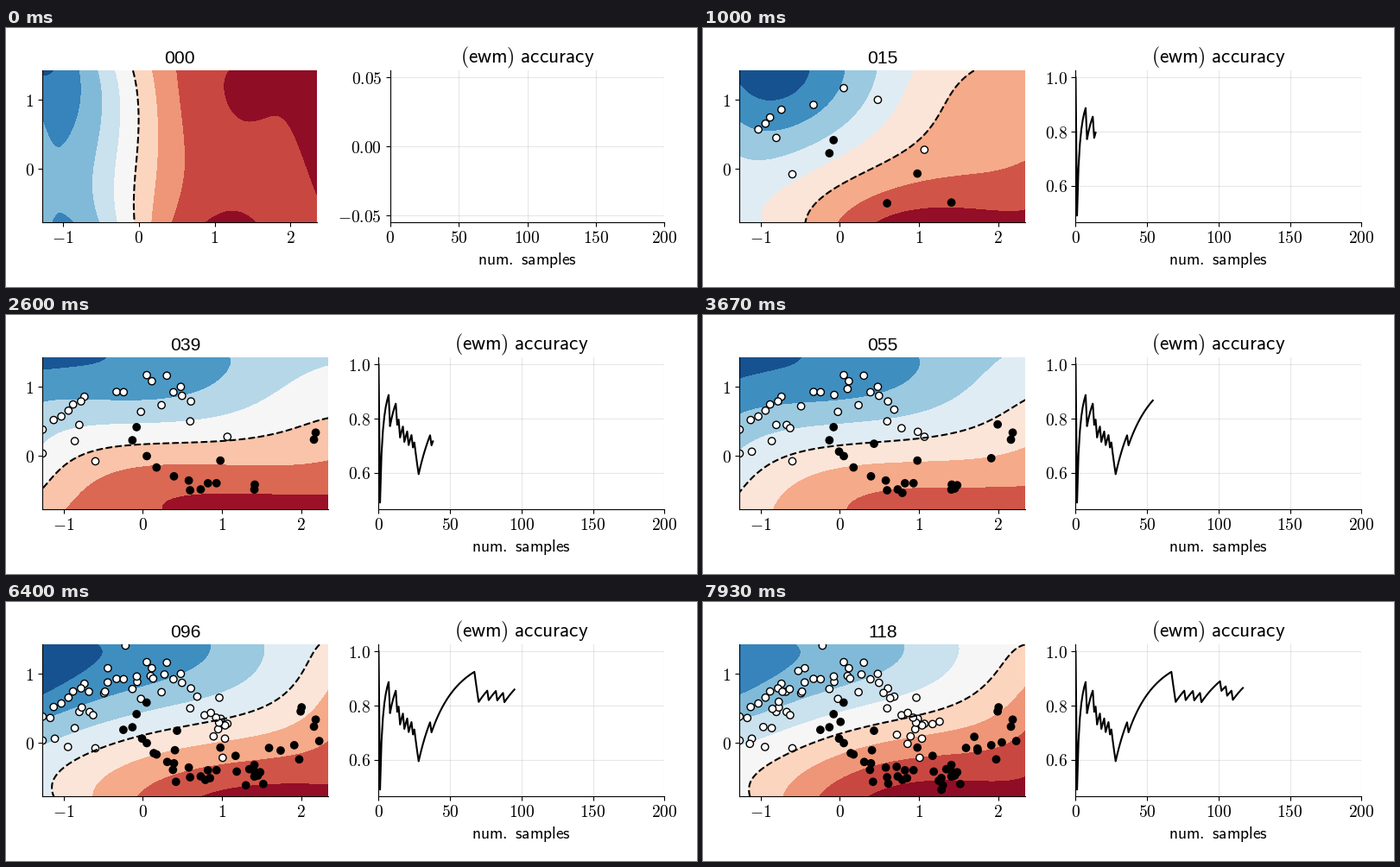
Recreate the animation shown at these times as a matplotlib script. Size 800x300 px, loop 8000 ms.

```python
import matplotlib.pyplot as plt
import numpy as np
from matplotlib.animation import FuncAnimation

plt.rcParams.update({
    "font.family": "DejaVu Sans",
    "font.size": 14,
    "mathtext.fontset": "cm",
    "axes.spines.top": False,
    "axes.spines.right": False,
    "xtick.major.pad": 3,
})

W, H, DPI = 800, 300, 100
FRAMES, LOOP_MS = 120, 8000
TOP, BOTTOM = 49.3, 225.3
XLIM, YLIM = (-1.267, 2.347), (-0.78, 1.425)

# Learning stages: step, lowest and highest band, and the classifier score
# on a coarse grid over the panel (rows from top to bottom)
STAGES = [
    (0, -5, 4, [[-4.2, -1.25, 2.1, 3.05, 3.6],
                [-3.0, -1.5, 1.9, 3.0, 3.5],
                [-2.7, -1.2, 1.85, 2.8, 3.2],
                [-2.65, -1.4, 2.3, 3.08, 2.7]]),
    (6, -4, 3, [[-3.6, -3.05, -0.1, 1.35, 1.5],
                [-2.8, -2.4, 0.3, 1.6, 1.6],
                [-2.05, -1.2, 1.15, 1.8, 1.8],
                [-1.9, -0.45, 2.25, 2.7, 2.5]]),
    (24, -5, 3, [[-4.9, -4.9, -3.6, -1.85, -0.65],
                 [-3.25, -3.4, -2.55, -1.05, -0.45],
                 [-1.2, -0.85, -0.6, 0.0, 0.55],
                 [-0.45, 0.8, 2.0, 2.7, 2.2]]),
    (39, -4, 3, [[-3.5, -2.95, -2.4, -1.75, -1.15],
                 [-1.85, -1.7, -1.55, -0.88, -0.2],
                 [-0.7, 0.5, 0.75, 0.75, 0.95],
                 [0.6, 1.6, 2.15, 2.5, 2.5]]),
    (96, -4, 4, [[-3.8, -2.9, -2.35, -1.15, 0.1],
                 [-3.0, -2.0, -1.3, -0.45, 1.1],
                 [-1.0, 0.1, 0.9, 1.4, 2.1],
                 [-0.3, 1.5, 2.8, 3.4, 3.3]]),
    (119, -5, 4, [[-3.8, -2.9, -2.3, -1.1, 0.0],
                  [-3.0, -2.05, -1.25, -0.3, 1.2],
                  [-1.0, 0.1, 1.15, 1.65, 2.35],
                  [-0.3, 1.8, 3.2, 3.5, 3.4]]),
]

# Steps at which the classifier guessed wrong
MISSES = {1, 8, 13, 15, 18, 21, 24, 26, 27, 28, 37, 68, 69, 70, 77, 83, 88,
          102, 106, 110}

# The opening samples: x, y, class (1 = black)
OPENING = [(-1.03, 0.57, 0), (0.98, -0.07, 1), (0.05, 1.17, 0),
           (-0.6, -0.08, 0), (1.41, -0.49, 1), (0.48, 1.0, 0)]


def basis(count, t):
    """Polynomial weights of evenly spaced nodes on [0, 1]."""
    nodes = np.linspace(0, 1, count)
    return np.vander(t, count) @ np.linalg.inv(np.vander(nodes, count))


def surface(grid):
    rows, cols = np.shape(grid)
    return (basis(rows, np.linspace(1, 0, 70)) @ np.array(grid)
            @ basis(cols, np.linspace(0, 1, 110)).T)


def moons(n, rng, noise=0.17):
    """Noisy samples from two interlocking half circles."""
    label = (rng.random(n) < 0.45).astype(int)
    angle = rng.uniform(0, np.pi, n)
    x = np.where(label, 1 - np.cos(angle), np.cos(angle))
    y = np.where(label, 0.5 - np.sin(angle), np.sin(angle))
    x = np.clip(x + rng.normal(0, noise, n), *XLIM)
    y = np.clip(y + rng.normal(0, noise, n), *YLIM)
    return np.column_stack([x, y, label])


def ewm(values, span=50):
    decay = 1 - 2 / (span + 1)
    total = weight = 0
    out = []
    for v in values:
        total, weight = total * decay + v, weight * decay + 1
        out.append(total / weight)
    return np.array(out)


GX, GY = np.meshgrid(np.linspace(*XLIM, 110), np.linspace(*YLIM, 70))
STEPS = np.array([s[0] for s in STAGES])
SURFACES = [surface(s[3]) for s in STAGES]
SAMPLES = np.vstack([OPENING,
                     moons(FRAMES - len(OPENING), np.random.default_rng(7))])
COLORS = np.where(SAMPLES[:, 2] == 1, "black", "white")
ACCURACY = ewm([i not in MISSES for i in range(FRAMES)])

fig = plt.figure(figsize=(W / DPI, H / DPI), dpi=DPI)
ax_map = fig.add_axes([0.05, 0.25, 0.4, 0.6])
ax_acc = fig.add_axes([0.55, 0.25, 0.4, 0.6])


def place(ax, left, right):
    ax.set_position([left / W, 1 - BOTTOM / H, (right - left) / W,
                     (BOTTOM - TOP) / H])


def score(k):
    """Score surface at step k with its lowest and highest band."""
    b = np.searchsorted(STEPS, k)
    a = max(b - 1, 0)
    t = (k - STEPS[a]) / max(STEPS[b] - STEPS[a], 1)
    z = (1 - t) * SURFACES[a] + t * SURFACES[b]
    return z, STAGES[b][1], STAGES[b][2]


def draw_map(k):
    z, lo, hi = score(k)
    ax_map.clear()
    ax_map.contourf(GX, GY, np.clip(z, lo + 0.01, hi - 0.01),
                    levels=np.arange(lo, hi + 1), cmap="RdBu_r")
    ax_map.contour(GX, GY, z, levels=[0], colors="black", linestyles="--",
                   linewidths=1.5)
    ax_map.scatter(SAMPLES[:k, 0], SAMPLES[:k, 1], s=36, c=COLORS[:k],
                   edgecolors="black", linewidths=1)
    ax_map.set(xlim=XLIM, ylim=YLIM)
    ax_map.set_xticks([-1, 0, 1, 2], ["$-1$", "$0$", "$1$", "$2$"])
    ax_map.set_yticks([0, 1], ["$0$", "$1$"])
    ax_map.set_title(f"{k:03d}", fontname="Liberation Sans", fontsize=15.2)


def draw_accuracy(k):
    digits = 2 if k < 2 else 1
    ax_acc.clear()
    ax_acc.plot(np.arange(k), ACCURACY[:k], color="black", lw=1.5)
    ax_acc.set_xlim(0, 200)
    ticks = range(0, 201, 50)
    ax_acc.set_xticks(ticks, [f"${v}$" for v in ticks])
    ax_acc.yaxis.set_major_formatter(
        lambda v, _: f"${round(v, 4) + 0:.{digits}f}$")
    ax_acc.grid(alpha=0.3)
    ax_acc.set_title(r"$\mathsf{(ewm)\ accuracy}$", pad=5.4)
    ax_acc.set_xlabel(r"$\mathsf{num.\hspace{0.36}samples}$", va="baseline")
    ax_acc.xaxis.set_label_coords(0.5, -0.278)


def update(k):
    # Wider tick labels at the start squeeze both panels
    squeeze = {0: 13.5, 1: 5}.get(k, 0)
    place(ax_map, 42.4, 373.4 - squeeze)
    place(ax_acc, 431.4 + squeeze, 762.4)
    draw_map(k)
    draw_accuracy(k)
    return []


anim = FuncAnimation(fig, update, frames=FRAMES, init_func=lambda: [],
                     interval=LOOP_MS / FRAMES, repeat=True, repeat_delay=0,
                     blit=False)
plt.show()
```
